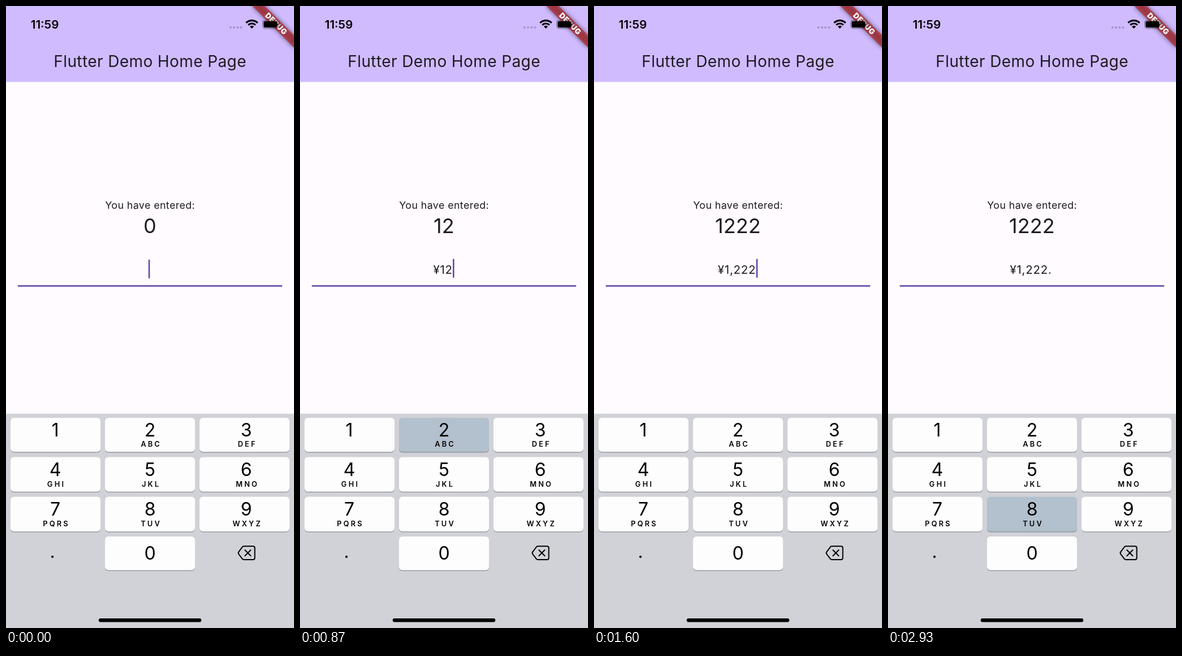
These frames come from a looping animation (509x1101 px, 2990 ms). An HTML page:

```html
<!DOCTYPE html>
<html lang="en">
<head>
<meta charset="utf-8">
<title>Number entry</title>
<style>
  html, body { margin: 0; width: 100%; height: 100%; overflow: hidden; background: #fffbff; }
  svg { display: block; width: 100%; height: 100%; font-family: Inter, Roboto, sans-serif; }
  text { text-anchor: middle; fill: #1d1b20; }
  .title { font-size: 28px; letter-spacing: .4px; }
  .label { font-size: 17.8px; letter-spacing: .42px; }
  .total { font-size: 36px; letter-spacing: .1px; }
  .field { font-size: 20.5px; letter-spacing: .75px; }
  .clock { font-size: 20.5px; font-weight: 600; fill: #000; }
  .digit { font-size: 32px; fill: #000; }
  .letters { font-size: 12.8px; font-weight: 600; letter-spacing: 3.2px; fill: #000; }
  .debug { font-size: 13.3px; font-weight: 900; letter-spacing: .5px; fill: #fff; }
  .line { fill: none; stroke: #000; }
</style>
</head>
<body>
<svg id="stage" viewBox="0 0 509 1101" xmlns="http://www.w3.org/2000/svg">
  <defs>
    <filter id="soft" x="-50%" y="-200%" width="200%" height="500%"><feGaussianBlur stdDeviation="4.5"/></filter>
  </defs>
  <rect width="509" height="1101" fill="#fffbff"/>
  <rect width="509" height="134.4" fill="#d0bbff"/>
  <text class="title" x="254.6" y="108.3">Flutter Demo Home Page</text>

  <g transform="translate(509 0) rotate(45)">
    <rect x="-52.2" y="36.5" width="104.4" height="15.7" opacity=".5" filter="url(#soft)"/>
    <rect x="-52.2" y="36.5" width="104.4" height="15.7" fill="#b71c1c" fill-opacity=".627"/>
    <text class="debug" x="0" y="49.1">DEBUG</text>
  </g>

  <text class="clock" x="68.5" y="40">11:59</text>
  <g id="signal" fill="#a796cd"></g>
  <g id="wifi"></g>
  <rect class="line" x="453.6" y="25" width="28" height="15" rx="5" stroke-opacity=".45" stroke-width="1.2"/>
  <rect x="455.3" y="26.7" width="24.6" height="11.6" rx="3.3"/>
  <path d="M483.3 30v5q2-.7 2-2.5t-2-2.5" fill-opacity=".45"/>

  <text class="label" x="254.7" y="358.8">You have entered:</text>
  <text class="total" id="total" x="254.4" y="402.3"></text>
  <text class="field" id="field" x="252.6" y="473.8"></text>
  <rect id="cursor" width="2.6" height="33.6" rx="1.3" fill="#6546a8"/>
  <rect x="20.9" y="494.2" width="467.2" height="2.6" fill="#6546a8"/>

  <rect y="721.6" width="509" height="380" fill="#d0d2d7"/>
  <g id="keys"></g>
  <text class="digit" x="82" y="976.5">.</text>
  <g class="line" stroke-width="2" stroke-linejoin="round" stroke-linecap="round">
    <path d="M420.5 956.3H436.5Q439.7 956.3 439.7 959.5V976.8Q439.7 980 436.5 980H420.5Q419 980 417.8 978.8L411.2 970Q409.8 968.2 411.2 966.4L417.8 957.5Q419 956.3 420.5 956.3Z"/>
    <path d="M422.3 963L432.5 973.2M432.5 963L422.3 973.2"/>
  </g>
  <rect x="163.8" y="1084" width="181.4" height="6.5" rx="3.25"/>
</svg>
<script>
const LOOP = 2990;
const $ = id => document.getElementById(id);

function add(parent, tag, attrs, text = '') {
  const el = document.createElementNS('http://www.w3.org/2000/svg', tag);
  for (const name in attrs) el.setAttribute(name, attrs[name]);
  el.textContent = text;
  parent.append(el);
  return el;
}

for (let i = 0; i < 4; i++) add($('signal'), 'circle', { cx: 396.8 + i * 6.2, cy: 38, r: 2.1 });

// Wi-Fi: two arcs above a small sector
const arc = r => {
  const d = r * Math.SQRT1_2;
  return `M${434.5 - d} ${40 - d}A${r} ${r} 0 0 1 ${434.5 + d} ${40 - d}`;
};
for (const r of [14.4, 9]) add($('wifi'), 'path', { d: arc(r), class: 'line', 'stroke-width': 3.1 });
add($('wifi'), 'path', { d: arc(5.2) + 'L434.5 40Z' });

const labelCentres = [87, 254.6, 424.7];
const rows = [
  { y: 729, height: 60.2 },
  { y: 798.4, height: 61.4 },
  { y: 868.8, height: 61.4 },
  { y: 939, height: 59.8 },
];
const keys = {};
function addKey(digit, letters, col, row) {
  const { y, height } = rows[row];
  const centre = labelCentres[col];
  const baseline = 762 + row * 70.2;
  const box = { x: 8 + col * 167, width: 159, height, rx: 6 };
  add($('keys'), 'rect', { ...box, y: y + 1.3, fill: '#8a8c90' });
  keys[digit] = add($('keys'), 'rect', { ...box, y });
  add($('keys'), 'text', { class: 'digit', x: centre, y: baseline + (letters || digit === '1' ? 0 : 7.4) }, digit);
  add($('keys'), 'text', { class: 'letters', x: centre + 2, y: baseline + 18.3 }, letters);
}
['', 'ABC', 'DEF', 'GHI', 'JKL', 'MNO', 'PQRS', 'TUV', 'WXYZ']
  .forEach((letters, i) => addKey(String(i + 1), letters, i % 3, Math.floor(i / 3)));
addKey('0', '', 1, 3);

// [time, total, field text, cursor centre]
const entries = [
  [0, '0', '', 253],
  [130, '1', '¥1', 265],
  [870, '12', '¥12', 271.3],
  [1200, '122', '¥122', 278],
  [1530, '1222', '¥1,222', 288],
  [2130, '1222', '¥1,222.', 291],
];
// [time, pressed key]
const presses = [
  [0, ''], [70, '1'], [270, ''], [800, '2'], [1000, ''], [1130, '2'],
  [1330, ''], [1400, '2'], [1600, ''], [2930, '8'],
];
// [time, cursor opacity]
const blinks = [
  [0, 1], [670, .75], [730, .25], [800, 0], [870, 1],
  [2070, .75], [2130, 1], [2670, .75], [2730, .25], [2800, 0],
];
const stepAt = (steps, t) => steps.findLast(step => step[0] <= t);

function draw(now) {
  const t = now % LOOP;
  const [, total, field, x] = stepAt(entries, t);
  const pressed = stepAt(presses, t)[1];
  $('total').textContent = total;
  $('field').textContent = field;
  $('cursor').setAttribute('x', x - 1.3);
  $('cursor').setAttribute('y', field ? 447.5 : 448.7);
  $('cursor').setAttribute('opacity', stepAt(blinks, t)[1]);
  for (const digit in keys) keys[digit].setAttribute('fill', digit === pressed ? '#b3c0cd' : '#fdfdfd');
}

let start;
function tick(now) {
  start ??= now;
  draw(now - start);
  requestAnimationFrame(tick);
}
draw(0);
requestAnimationFrame(tick);
</script>
</body>
</html>
```
